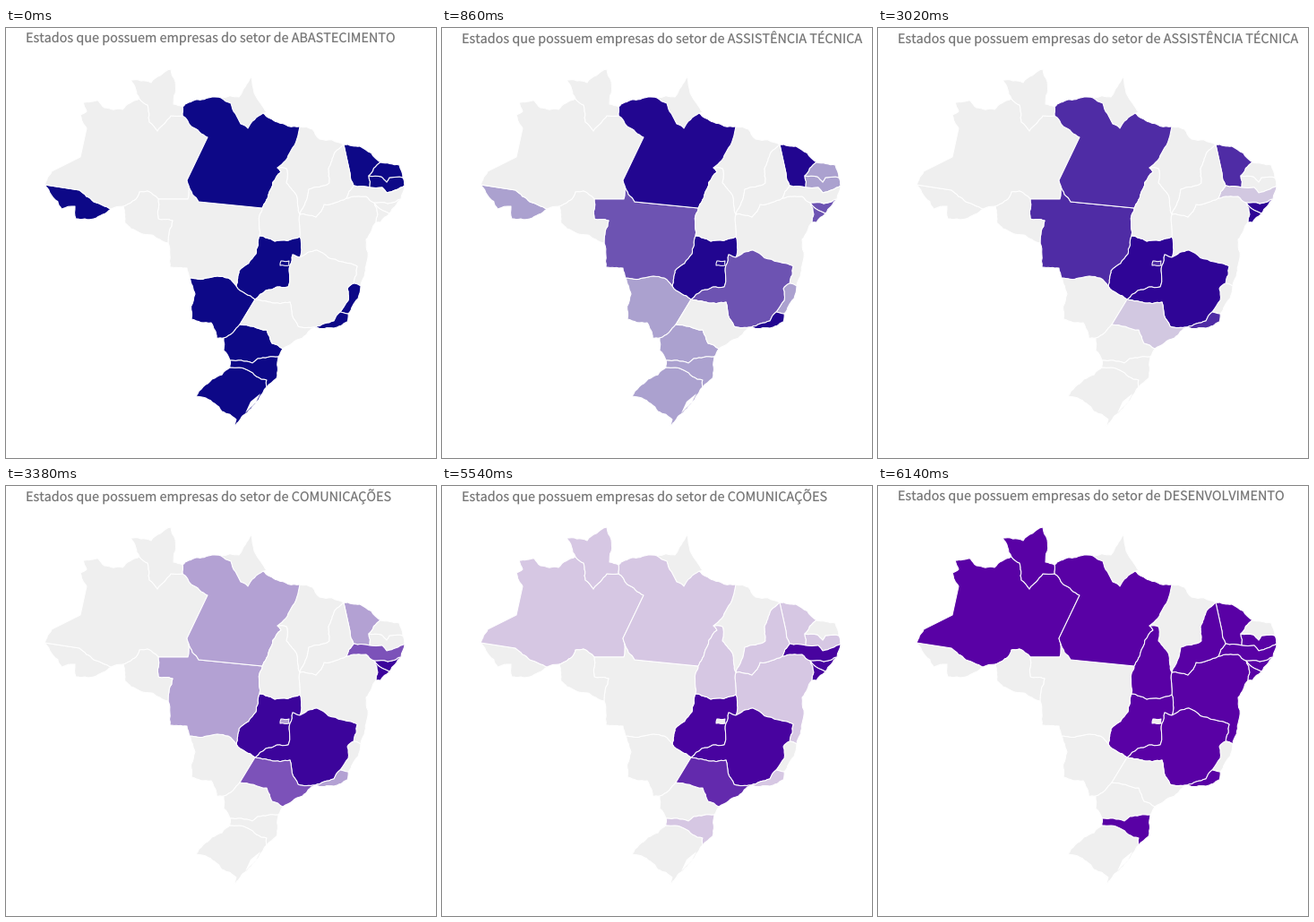
A matplotlib script for the animation above (8000 ms loop, 480x480 px).

```python
import math
import random

import matplotlib.pyplot as plt
from matplotlib.animation import FuncAnimation
from matplotlib.collections import PolyCollection

SIZE, DPI = 480, 100
TICK, LOOP = 20, 8000
FIRST, PERIOD, STEP, STEPS = 500, 2520, 120, 6
GREY = (0.937, 0.937, 0.937)
SURVEYED = 32  # segments longer than this are straight lines
PREFIX = "Estados que possuem empresas do setor de "

SECTORS = [
    ("ABASTECIMENTO", "AC PA CE RN PB GO DF MS ES RJ PR SC RS".split()),
    ("ASSISTÊNCIA TÉCNICA", "PA CE MT GO DF MG RJ AL SE".split()),
    ("COMUNICAÇÕES", "PE AL SE GO MG SP".split()),
    ("DESENVOLVIMENTO",
     "AM RR PA TO PI CE PB PE AL SE BA GO MG RJ SC".split()),
]

# Key points where states meet, in pixels
JOINTS = {
    "AC/AM west": (43, 175), "AC/AM east": (117, 202), "AM/RO": (131, 199),
    "AM/RO/MT": (170, 191), "RO/MT": (181, 240), "AM/RR": (149, 79),
    "AM/RR/PA": (197, 98), "RR/PA": (197, 88), "AM/PA/MT": (204, 176),
    "PA/AP west": (240, 78), "PA/AP east": (270, 112), "PA/MA": (328, 110),
    "PA/MA/TO": (303, 156), "PA/MT/TO": (286, 201), "MA/PI/CE": (377, 130),
    "MA/TO/PI/BA": (328, 208), "PI/CE/PE": (388, 176),
    "PI/PE/BA": (380, 190), "CE/RN": (418, 150), "CE/RN/PB": (405, 165),
    "CE/PB/PE": (406, 178), "RN/PB": (443, 167), "PB/PE": (445, 176),
    "PE/AL": (441, 191), "AL/SE": (428, 207), "SE/BA": (413, 217),
    "PE/AL/SE/BA": (411, 195), "TO/GO/BA": (328, 233),
    "MT/TO/GO": (283, 232), "GO/BA/MG": (328, 256), "MT/MS": (205, 279),
    "MT/GO/MS": (257, 288), "MS/GO/MG/SP": (278, 303),
    "MS/SP/PR": (261, 331), "MS/PR": (243, 346), "BA/MG/ES": (388, 285),
    "BA/ES": (396, 288), "MG/ES/RJ": (373, 317), "ES/RJ": (382, 319),
    "MG/RJ/SP": (345, 334), "SP/PR": (309, 358), "PR/SC west": (250, 371),
    "PR/SC east": (304, 367), "SC/RS west": (250, 379),
    "SC/RS east": (291, 401),
}

rng = random.Random(7)
arcs = []


def roughen(p, q):
    """Points after p up to q along a ragged line (midpoint displacement)."""
    dx, dy = q[0] - p[0], q[1] - p[1]
    if not 4 < math.hypot(dx, dy) < SURVEYED:
        return [q]
    d = rng.uniform(-0.09, 0.09)
    mid = (p[0] + dx / 2 - dy * d, p[1] + dy / 2 + dx * d)
    return roughen(p, mid) + roughen(mid, q)


def arc(states, *stops):
    """A line along one state (coast, frontier) or between two."""
    pts = [JOINTS.get(s, s) for s in stops]
    line = pts[:1]
    for p, q in zip(pts, pts[1:]):
        line += roughen(p, q)
    arcs.append((states.split(), line))


# North
arc("AC", "AC/AM east", (98, 213), (78, 213), (77, 199), (62, 202),
    (51, 187), "AC/AM west")
arc("AC AM", "AC/AM west", (82, 181), (98, 194), "AC/AM east")
arc("AM", "AC/AM west", (51, 160), (83, 144), (90, 112), (83, 97), (90, 93),
    (86, 83), (103, 81), (110, 89), (130, 91), "AM/RR")
arc("AM", "AC/AM east", "AM/RO")
arc("AM RR", "AM/RR", (158, 86), (160, 105), (169, 115), (184, 98),
    "AM/RR/PA")
arc("RR", "AM/RR", (139, 58), (162, 61), (184, 46), (189, 60), (187, 85),
    "RR/PA")
arc("RR PA", "RR/PA", "AM/RR/PA")
arc("AM PA", "AM/RR/PA", (207, 110), (225, 122), (202, 170), "AM/PA/MT")
arc("AM MT", "AM/PA/MT", (203, 191), "AM/RO/MT")
arc("AM RO", "AM/RO", (145, 191), (149, 183), (158, 182), "AM/RO/MT")
arc("RO", "AM/RO", (133, 218), (148, 228), (163, 231), "RO/MT")
arc("RO MT", "AM/RO/MT", (170, 213), (186, 215), "RO/MT")
arc("PA", "RR/PA", (212, 80), (230, 77), "PA/AP west")
arc("PA AP", "PA/AP west", (251, 84), (262, 107), "PA/AP east")
arc("AP", "PA/AP west", (260, 77), (274, 54), (280, 78), (291, 94),
    "PA/AP east")
arc("PA", "PA/AP east", (287, 95), (303, 105), "PA/MA")
arc("PA MA", "PA/MA", (318, 137), "PA/MA/TO")
arc("PA TO", "PA/MA/TO", (307, 161), (293, 186), "PA/MT/TO")
arc("PA MT", "AM/PA/MT", (215, 194), "PA/MT/TO")

# Northeast
arc("MA", "PA/MA", (342, 113), (350, 124), "MA/PI/CE")
arc("MA TO", "PA/MA/TO", (313, 157), (313, 173), (325, 190), "MA/TO/PI/BA")
arc("MA PI", "MA/PI/CE", (367, 139), (360, 157), (361, 173), (338, 180),
    "MA/TO/PI/BA")
arc("PI CE", "MA/PI/CE", (384, 162), "PI/CE/PE")
arc("PI PE", "PI/CE/PE", "PI/PE/BA")
arc("PI BA", "PI/PE/BA", (355, 197), (346, 211), "MA/TO/PI/BA")
arc("CE", "MA/PI/CE", (395, 132), "CE/RN")
arc("CE RN", "CE/RN", "CE/RN/PB")
arc("CE PB", "CE/RN/PB", "CE/PB/PE")
arc("CE PE", "CE/PB/PE", "PI/CE/PE")
arc("RN", "CE/RN", (439, 153), "RN/PB")
arc("RN PB", "RN/PB", (428, 167), (425, 172), (419, 166), "CE/RN/PB")
arc("PB", "RN/PB", "PB/PE")
arc("PB PE", "PB/PE", (425, 184), (420, 178), "CE/PB/PE")
arc("PE", "PB/PE", "PE/AL")
arc("PE AL", "PE/AL", (426, 196), "PE/AL/SE/BA")
arc("PE BA", "PI/PE/BA", (402, 188), "PE/AL/SE/BA")
arc("AL", "PE/AL", "AL/SE")
arc("AL SE", "AL/SE", "PE/AL/SE/BA")
arc("SE", "AL/SE", (418, 217), "SE/BA")
arc("SE BA", "PE/AL/SE/BA", (415, 208), "SE/BA")
arc("BA", "SE/BA", (402, 236), (402, 265), "BA/ES")
arc("BA ES", "BA/ES", "BA/MG/ES")
arc("BA MG", "GO/BA/MG", (347, 248), (375, 261), (392, 266), "BA/MG/ES")
arc("BA GO", "TO/GO/BA", "GO/BA/MG")
arc("TO BA", "MA/TO/PI/BA", "TO/GO/BA")

# Centre-west
arc("TO GO", "MT/TO/GO", (300, 238), "TO/GO/BA")
arc("TO MT", "PA/MT/TO", "MT/TO/GO")
arc("MT GO", "MT/TO/GO", (279, 252), (260, 271), "MT/GO/MS")
arc("MT", "RO/MT", (183, 267), (202, 268), "MT/MS")
arc("MT MS", "MT/MS", (224, 279), (248, 279), "MT/GO/MS")
arc("MS", "MT/MS", (211, 297), (207, 325), (229, 329), (235, 346), "MS/PR")
arc("MS GO", "MT/GO/MS", "MS/GO/MG/SP")
arc("MS SP", "MS/GO/MG/SP", "MS/SP/PR")
arc("MS PR", "MS/SP/PR", "MS/PR")
arc("GO MG", "GO/BA/MG", (320, 253), (317, 265), (315, 289), (290, 293),
    "MS/GO/MG/SP")
arc("DF", (306, 265), (307, 260), (316, 260), (316, 265), (306, 265))

# Southeast and south
arc("MG SP", "MS/GO/MG/SP", (295, 306), (317, 306), (326, 333), "MG/RJ/SP")
arc("MG RJ", "MG/RJ/SP", (366, 327), "MG/ES/RJ")
arc("MG ES", "BA/MG/ES", (381, 291), (382, 304), "MG/ES/RJ")
arc("ES", "BA/ES", (393, 302), "ES/RJ")
arc("ES RJ", "MG/ES/RJ", "ES/RJ")
arc("RJ", "ES/RJ", (381, 328), (366, 335), "MG/RJ/SP")
arc("SP", "MG/RJ/SP", (331, 346), "SP/PR")
arc("SP PR", "SP/PR", (297, 352), (291, 337), "MS/SP/PR")
arc("PR", "MS/PR", (243, 360), "PR/SC west")
arc("PR", "SP/PR", "PR/SC east")
arc("PR SC", "PR/SC west", (275, 374), (281, 369), "PR/SC east")
arc("SC", "PR/SC west", "SC/RS west")
arc("SC", "PR/SC east", (302, 391), "SC/RS east")
arc("SC RS", "SC/RS west", (270, 382), (291, 393), "SC/RS east")
arc("RS", "SC/RS west", (230, 392), (212, 411), (223, 413), (241, 428),
    (257, 437), (254, 446), (264, 433), (282, 415), "SC/RS east")


def outline(state):
    """Chain the lines that touch a state into one ring."""
    parts = [pts for names, pts in arcs if state in names]
    ring = list(parts.pop(0))
    while parts:
        pts = next(p for p in parts if ring[-1] in (p[0], p[-1]))
        parts.remove(pts)
        ring += (pts if pts[0] == ring[-1] else pts[::-1])[1:]
    return ring


# The federal district lies inside GO, so it is drawn last.
STATES = sorted({s for names, _ in arcs for s in names} - {"DF"}) + ["DF"]


def shade(k):
    return plt.cm.plasma(max(k, 0) / 19)[:3]


def fill(state, k, u):
    """Colour of a state on the way from sector k to sector k + 1."""
    before = state in SECTORS[k][1]
    after = state in SECTORS[k + 1][1]
    weight = before * (1 - u) + after * u
    tone = shade(k + u if before else k + 1)
    return tuple(g + (c - g) * weight for g, c in zip(GREY, tone))


plt.rcParams["text.hinting"] = "none"
fig = plt.figure(figsize=(SIZE / DPI, SIZE / DPI), dpi=DPI, facecolor="white")
ax = fig.add_axes([0, 0, 1, 1])
ax.set_xlim(0, SIZE)
ax.set_ylim(SIZE, 0)
ax.axis("off")

regions = PolyCollection([outline(s) for s in STATES], edgecolors="white",
                         linewidths=0.75, joinstyle="round")
ax.add_collection(regions, autolim=False)
lagoon = [(284, 408), (273, 417), (267, 430), (279, 418)]
ax.add_patch(plt.Polygon(lagoon, color="white", lw=0, zorder=3))
title = ax.text(22.2, 17, "", family="Noto Sans CJK JP", fontsize=10.36,
                color="#787878", va="baseline")


def update(i):
    k, since = divmod(i * TICK - FIRST, PERIOD)
    step = min(since // STEP + 1, STEPS)
    regions.set_facecolor([fill(s, k, step / STEPS) for s in STATES])
    title.set_text(PREFIX + SECTORS[k + (step >= STEPS / 2)][0])
    return regions, title


anim = FuncAnimation(fig, update, frames=LOOP // TICK, interval=TICK,
                     repeat=True, repeat_delay=0)
plt.show()
```
